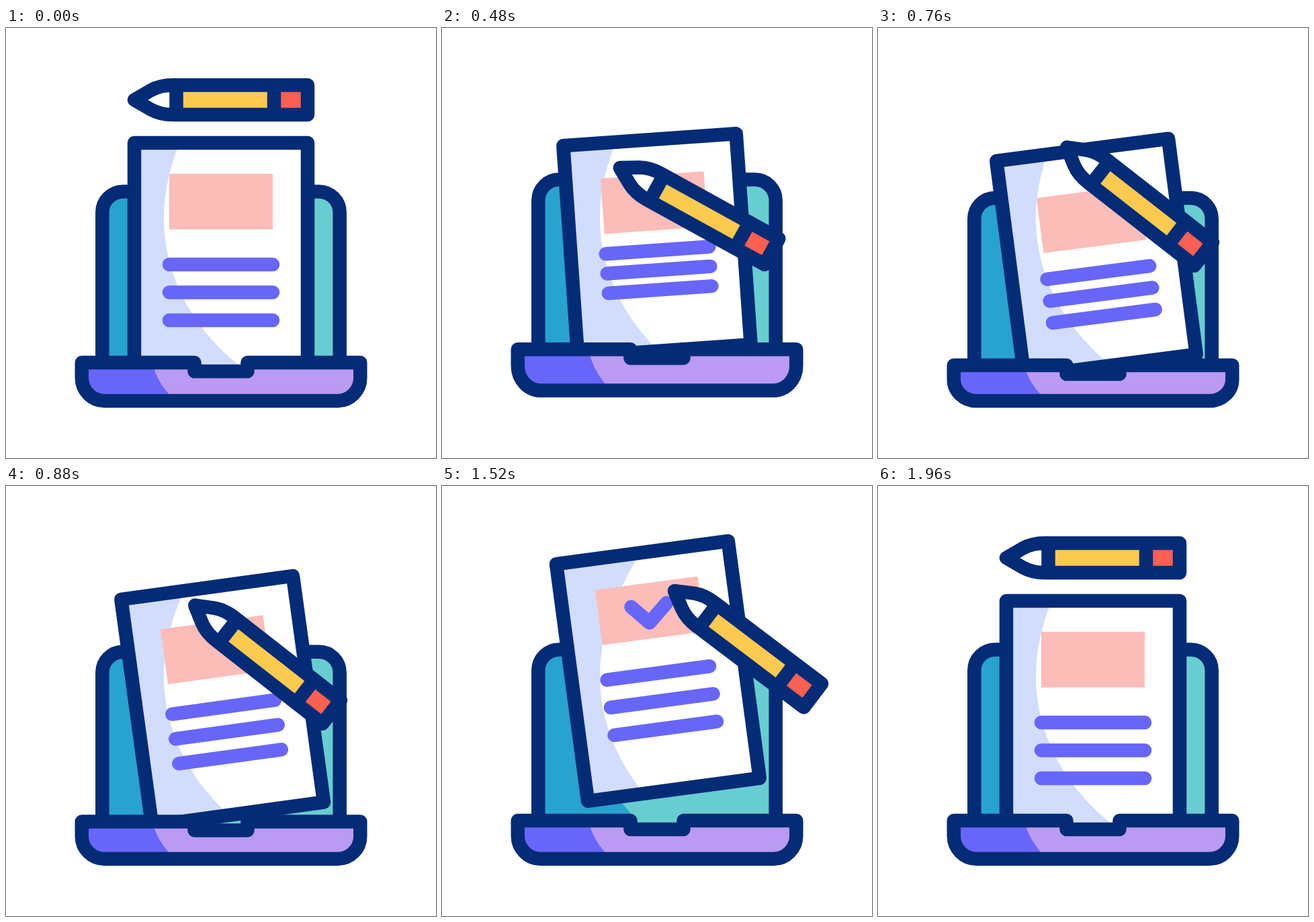
Write an HTML page with a canvas that moves like this. It is 640 px wide and 640 px high and loops after 2 s.

```html
<!DOCTYPE html>
<html lang="en">
<head>
<meta charset="utf-8">
<title>Writing on a laptop</title>
<style>
html, body { margin: 0; height: 100%; overflow: hidden; background: #fff; }
canvas { display: block; }
</style>
</head>
<body>
<canvas id="stage" width="640" height="640"></canvas>
<script>
const ctx = document.getElementById('stage').getContext('2d');
const NAVY = '#042b76', INDIGO = '#6866f9', LINE = 20.5;
const LOOP = 2000, START = 80, WRITE = 970, WRITTEN = 1410, LEAVE = 1480;
const SHEET_WIDTH = 258;

const mix = (a, b, k) => a + (b - a) * k;
const ramp = (t, a, b) => Math.min(1, Math.max(0, (t - a) / (b - a)));
const ease = (t, a, b) => { const p = ramp(t, a, b); return p * p * (3 - 2 * p); };
const glide = (t, a, b) => (ramp(t, a, b) + ease(t, a, b)) / 2;
// rises from a to b, falls from c to d
const pulse = (t, a, b, c, d) => ease(t, a, b) - ease(t, c, d);
const rad = deg => deg * Math.PI / 180;

const hop = t => pulse(t, START, 240, 460, 640);
const sink = t => pulse(t, 240, 760, 760, 960);

function paperPose(t) {
  const toss = pulse(t, START, 240, 240, 600);
  const squash = pulse(t, START, 580, 580, 1080);
  const rise = pulse(t, 760, 1080, LEAVE, 1860);
  const lean = pulse(t, START, 870, LEAVE, 1905);
  const sway = pulse(t, 480, 760, 760, 960);
  const drop = sink(t);
  const height = 356 - 46 * squash;
  return {
    x: 320 + 1.5 * rise + 5 * sway,
    y: 171 - 36 * toss + 9 * drop - 76 * rise + height / 2,
    deg: -7.8 * lean,
    height,
    boxY: 46 - 8 * toss + 2.5 * squash + 14.5 * drop,
    lineY: 181 - 13 * toss - 24 * squash + 20 * drop,
    gap: 41.5 - 3.4 * toss - 12.5 * squash
  };
}

// tick mark, measured from the paper's top left corner
const tick = [[102, 78], [126, 105], [170, 66]];
const leg = i => Math.hypot(tick[i + 1][0] - tick[i][0], tick[i + 1][1] - tick[i][1]);
const tickLength = leg(0) + leg(1);

function tickPoint(part) {
  const d = part * tickLength, i = d > leg(0) ? 1 : 0;
  const k = (d - i * leg(0)) / leg(i);
  return [0, 1].map(c => mix(tick[i][c], tick[i + 1][c], k));
}

function onPaper({ x, y, deg, height }, [u, v]) {
  const a = rad(deg), dx = u - SHEET_WIDTH / 2, dy = v - height / 2;
  return [
    x + dx * Math.cos(a) - dy * Math.sin(a),
    y + dx * Math.sin(a) + dy * Math.cos(a)
  ];
}

const writingPose = paperPose(WRITTEN);

function pencilPose(t) {
  const [x, y] = onPaper(writingPose, tickPoint(ramp(t, WRITE, WRITTEN)));
  const near = glide(t, START, 600) - ease(t, LEAVE + 20, 1960);
  const turn = glide(t, START, 640) - ease(t, LEAVE, 1925);
  return [mix(191, x, near), mix(107, y, near) + 45 * hop(t), 38 * turn];
}

function fill(path, color) {
  ctx.fillStyle = color;
  ctx.fill(new Path2D(path));
}

function stroke(path, color = NAVY) {
  ctx.strokeStyle = color;
  ctx.stroke(new Path2D(path));
}

// fills `shape`, then shades the part of it inside `shade`
function shaded(shape, color, shade, shadeColor) {
  fill(shape, color);
  ctx.save();
  ctx.clip(new Path2D(shape));
  fill(shade, shadeColor);
  ctx.restore();
}

function place(x, y, deg) {
  ctx.translate(x, y);
  ctx.rotate(rad(deg));
}

function drawScreen(top) {
  const shape = `M143.3 525V${top + 31}a31 31 0 0 1 31-31H465.7a31 31 0 0 1 31 31V525Z`;
  shaded(shape, '#68cdd0', 'M0 0H235Q180 380 262 465Q283 490 318 530H0Z', '#28a2ce');
  stroke(shape);
}

function drawPaper({ x, y, deg, height, boxY, lineY, gap }, ink) {
  const sheet = `M0 0H${SHEET_WIDTH}V${height}H0Z`;
  ctx.save();
  place(x, y, deg);
  ctx.translate(-SHEET_WIDTH / 2, -height / 2);
  fill(sheet, '#fff');

  // the shade keeps its place on the stage while the sheet moves
  ctx.save();
  ctx.clip(new Path2D(sheet));
  ctx.resetTransform();
  fill('M0 0H345L300 93C272 135 235 205 235 283C235 365 275 445 346 501L400 540H0Z', '#d2ddfd');
  ctx.restore();

  fill(`M52 ${boxY}h154v82.7h-154Z`, '#fcbdb9');
  for (let i = 0; i < 3; i++) stroke(`M52 ${lineY + i * gap}h154`, INDIGO);
  if (ink > 0) {
    ctx.setLineDash([ink * tickLength, 999]);
    stroke('M' + tick.join('L'), INDIGO);
    ctx.setLineDash([]);
  }
  stroke(sheet);
  ctx.restore();
}

function drawBase(top, bottom) {
  const h = bottom - top, ry = h * 0.6;
  const shape = `M112.8 ${top}H280.5v13H359.5v-13H527.3V${bottom - ry}`
    + `A34 ${ry} 0 0 1 493.3 ${bottom}H146.8A34 ${ry} 0 0 1 112.8 ${bottom - ry}Z`;
  const shade = `M100 ${top}H218Q224 ${top + h * 0.53} 252 ${bottom}H100Z`;
  shaded(shape, '#ba9af2', shade, INDIGO);
  stroke(shape);
}

function drawPencil(x, y, deg) {
  const shape = 'M0 0L25-14.5Q39-22 57-22H258V22H57Q39 22 25 14.5Z';
  ctx.save();
  place(x, y, deg);
  fill(shape, '#fff');
  fill('M62.5-22H208V22H62.5Z', '#fdca50');
  fill('M208-22H258V22H208Z', '#ff6052');
  stroke(shape + 'M62.5-22V22M208-22V22');
  ctx.restore();
}

function draw(now) {
  const t = now % LOOP, up = hop(t), down = sink(t);
  const ink = ramp(t, WRITE, WRITTEN) - ramp(t, LEAVE, LEAVE + 200);

  ctx.fillStyle = '#fff';
  ctx.fillRect(0, 0, 640, 640);
  ctx.lineWidth = LINE;
  ctx.lineJoin = ctx.lineCap = 'round';
  drawScreen(243.5 - 23 * up + 9.5 * down);
  drawPaper(paperPose(t), ink);
  drawBase(498 - 22.5 * up + 4 * down, 555 - 16 * up);
  drawPencil(...pencilPose(t));
  requestAnimationFrame(draw);
}

draw(performance.now());
</script>
</body>
</html>
```
